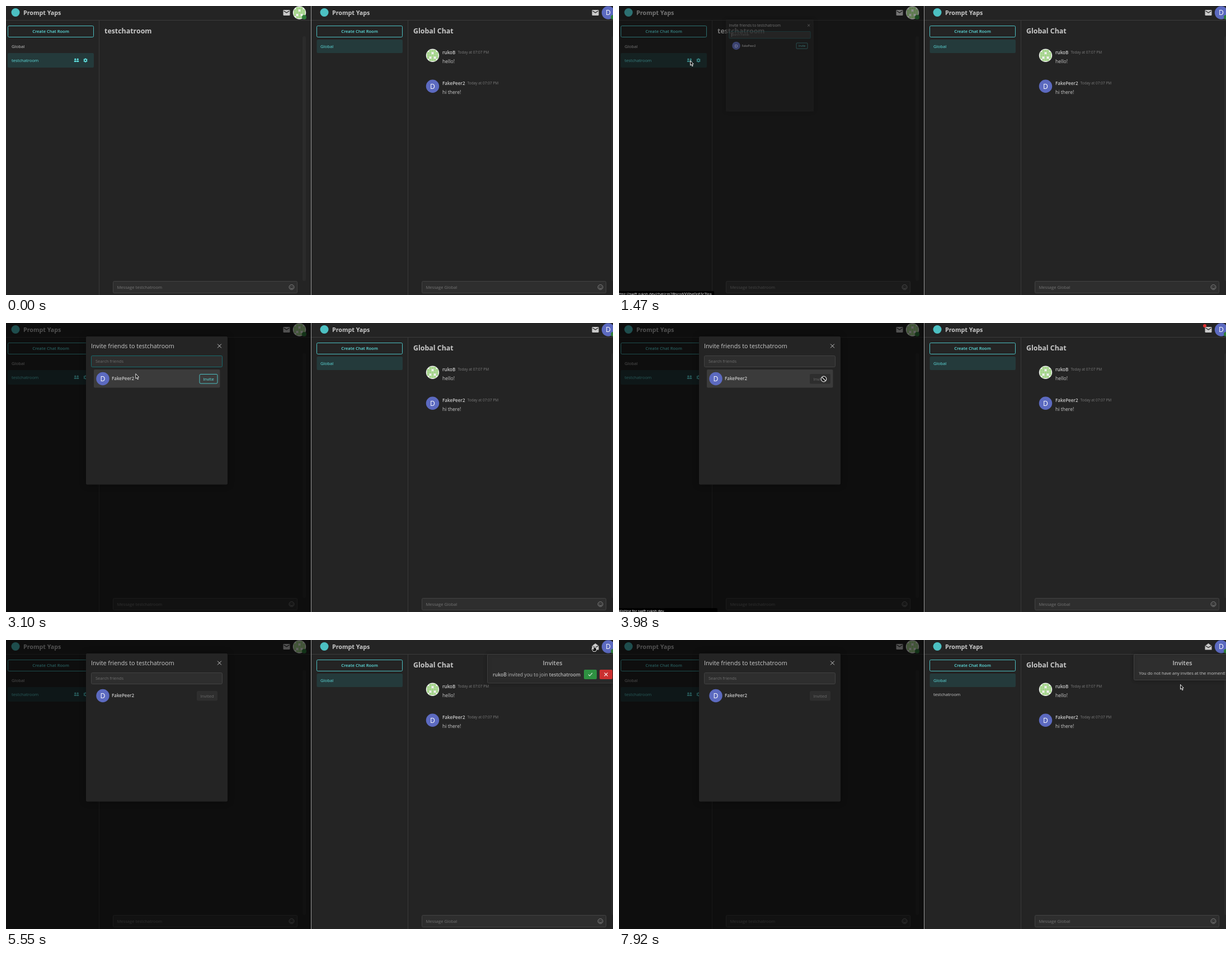
An HTML page with a canvas for the animation above (7990 ms loop, 1085 by 516 pixels).

```html
<!DOCTYPE html>
<html lang="en">
<head>
<meta charset="utf-8">
<title>Chat room invite</title>
<style>
html, body { margin: 0; width: 100%; height: 100%; overflow: hidden; background: #242424; }
canvas { display: block; }
</style>
</head>
<body>
<canvas id="stage" width="1085" height="516"></canvas>
<script>
const ctx = document.getElementById('stage').getContext('2d');
const LOOP = 7990;
const APP = 'Prompt Yaps', HOST = 'rukoB', GUEST = 'FakePeer2', ROOM = 'testchatroom';
const C = {
  bg: '#242424', panel: '#2e2e2e', line: '#424242', text: '#c9c9c9', dim: '#7a7a7a',
  cyan: '#5fe0e0', edge: '#4cc0c2', active: '#243a3b', indigo: '#5c6ac0', leaf: '#a4d48a',
  online: '#2f7d3b', green: '#2f9e44', red: '#e03131'
};

const clamp = v => Math.max(0, Math.min(1, v));
const ramp = (t, from, to) => clamp((t - from) / (to - from));
const easeOut = x => 1 - (1 - x) ** 2;
const between = (t, a, b) => t >= a && t < b;

function rect(x, y, w, h, fill, stroke, r = 2) {
  ctx.beginPath();
  ctx.roundRect(x, y, w, h, r);
  if (fill) { ctx.fillStyle = fill; ctx.fill(); }
  if (stroke) { ctx.strokeStyle = stroke; ctx.lineWidth = 1; ctx.stroke(); }
}

function disc(x, y, r, fill) {
  ctx.beginPath();
  ctx.arc(x, y, r, 0, Math.PI * 2);
  ctx.fillStyle = fill;
  ctx.fill();
}

function path(points, color, width = 1) {
  ctx.beginPath();
  points.forEach(([x, y]) => ctx.lineTo(x, y));
  ctx.strokeStyle = color;
  ctx.lineWidth = width;
  ctx.stroke();
}

// y is the middle of the capitals; returns the x after the text
function text(str, x, y, size, color = C.text, weight = 400, align = 'left') {
  ctx.font = `${weight} ${size}px "Open Sans", "Noto Sans", sans-serif`;
  ctx.textAlign = align;
  ctx.fillStyle = color;
  ctx.fillText(str, x, y + size * 0.36);
  return x + ctx.measureText(str).width;
}

function cross(x, y, r, color, width = 1) {
  path([[x - r, y - r], [x + r, y + r]], color, width);
  path([[x - r, y + r], [x + r, y - r]], color, width);
}

function letterAvatar(x, y) {
  disc(x, y, 11.7, C.indigo);
  text('D', x, y, 12.2, '#fff', 400, 'center');
}

function blockAvatar(x, y) {
  ctx.save();
  disc(x, y, 11.7, '#f0f0f0');
  ctx.clip();
  ctx.fillStyle = C.leaf;
  ['01110', '11011', '11111', '10101', '01110'].forEach((row, j) =>
    [...row].forEach((on, i) => {
      if (on === '1') ctx.fillRect(x - 10 + i * 4, y - 10 + j * 4, 4.05, 4.05);
    }));
  ctx.restore();
}

function mail(x, open) {
  if (open) {
    ctx.beginPath();
    [[x - 6, 10.5], [x, 6], [x + 6, 10.5], [x + 6, 17.5], [x - 6, 17.5]].forEach(p => ctx.lineTo(...p));
    ctx.fillStyle = C.text;
    ctx.fill();
    path([[x - 5, 10.5], [x, 13.5], [x + 5, 10.5]], C.bg, 1.2);
  } else {
    rect(x - 6, 7, 12, 10, C.text, null, 1.2);
    path([[x - 5, 8.8], [x, 12], [x + 5, 8.8]], C.bg, 1.2);
  }
}

function people(x, y) {
  for (const dx of [-2.2, 2.2]) {
    disc(x + dx, y - 1.8, 1.6, C.cyan);
    rect(x + dx - 2.1, y + 0.6, 4.2, 2.5, C.cyan, null, 1);
  }
}

function gear(x, y) {
  for (let i = 0; i < 6; i++) {
    const a = i * Math.PI / 3 + Math.PI / 6;
    disc(x + Math.cos(a) * 2.8, y + Math.sin(a) * 2.8, 1, C.cyan);
  }
  disc(x, y, 2.9, C.cyan);
  disc(x, y, 1.3, C.active);
}

function smiley(x, y) {
  ctx.strokeStyle = '#8c8c8c';
  ctx.lineWidth = 0.9;
  ctx.beginPath();
  ctx.arc(x, y, 4.4, 0, Math.PI * 2);
  ctx.stroke();
  ctx.beginPath();
  ctx.arc(x, y + 0.3, 2.3, 0.15, Math.PI - 0.15);
  ctx.stroke();
  disc(x - 1.5, y - 1.4, 0.6, '#8c8c8c');
  disc(x + 1.5, y - 1.4, 0.6, '#8c8c8c');
}

function message(y, name, body, avatar) {
  avatar(210.5, y + 5.2);
  const end = text(name, 228, y, 8.1, C.text, 600);
  text('Today at 07:07 PM', end + 4, y, 6.55, C.dim);
  text(body, 228, y + 16, 8.6);
}

function shell(title, placeholder, avatar, opened) {
  ctx.fillStyle = C.bg;
  ctx.fillRect(-6, 0, 552, 516);
  ctx.fillStyle = '#3b3b3b';
  ctx.fillRect(-6, 25, 551, 1);
  ctx.fillRect(166, 26, 1, 490);
  disc(17, 11.5, 7.5, C.edge);
  text(APP, 31, 12, 10.7, C.text, 700);
  mail(501.5, opened);
  avatar(524.5, 12);
  disc(533, 20, 4, C.online);
  rect(3.5, 35.5, 153, 20, null, C.edge);
  text('Create Chat Room', 80, 45.5, 7.5, C.cyan, 600, 'center');
  text(title, 176, 45, 12.4, C.text, 700);
  rect(530, 54, 6, 437, '#2b2b2b', null, 3);
  rect(191.5, 491.5, 329, 21, C.panel, C.line);
  text(placeholder, 198.5, 502, 7.6, '#747474');
  smiley(510.5, 502);
}

function hostSide() {
  shell(ROOM, 'Message ' + ROOM, blockAvatar, false);
  text('Global', 10, 72.5, 7.75);
  rect(3, 84, 154, 26, C.active);
  text(ROOM, 10, 97, 7.7, C.cyan);
  people(126, 97);
  gear(142, 97);
}

function guestSide(t) {
  const opened = t >= 5420, joined = t >= 7590;
  ctx.save();
  ctx.translate(552, 0);
  shell('Global Chat', 'Message Global', letterAvatar, opened);
  rect(3.5, 60, 153.5, 24, C.active);
  text('Global', 10, 72.5, 7.75, C.cyan);
  if (joined) text(ROOM, 10, 97, 7.7);
  message(83, HOST, 'hello!', blockAvatar);
  message(138, GUEST, 'hi there!', letterAvatar);
  ctx.restore();
  if (between(t, 3900, 5420)) disc(1047, 5, 3, C.red);
  if (opened) invites(t, joined);
}

function invites(t, joined) {
  ctx.save();
  ctx.globalAlpha = ramp(t, 5400, 5570);
  ctx.shadowColor = 'rgba(0,0,0,.3)';
  ctx.shadowBlur = 6;
  const x = joined ? 920.5 : 860.5;
  rect(x, 25.5, 240, joined ? 46 : 51.5, C.panel, C.line);
  ctx.shadowBlur = 0;
  text('Invites', joined ? 1007 : 977, 41, 10.9, C.text, 600, 'center');
  if (joined) {
    text('You do not have any invites at the moment!', 929.5, 59, 7.65);
  } else {
    let end = text(HOST, 870, 62, 8.6, C.text, 600);
    end = text(' invited you to join ', end, 62, 8.6);
    text(ROOM, end, 62, 8.6, C.text, 600);
    rect(1033, 53, 23, 17, t > 7180 ? '#2b8a3e' : C.green);
    path([[1041, 61.7], [1043.3, 64], [1048, 58.8]], '#fff', 1.1);
    rect(1061, 53, 23, 17, C.red);
    cross(1072.5, 61.5, 3, '#fff', 1.1);
  }
  ctx.restore();
}

function dialog(t) {
  const p = easeOut(ramp(t, 1394, 1594));
  if (!p) return;
  const sent = t >= 3840;
  const fade = p ** 1.4;
  ctx.fillStyle = `rgba(0,0,0,${0.6 * p ** 0.75})`;
  ctx.fillRect(0, 0, 545, 516);
  ctx.save();
  ctx.globalAlpha = fade;
  ctx.translate(269.5, 24);
  ctx.scale(p, p);
  ctx.translate(-269.5, -24);
  ctx.shadowColor = 'rgba(0,0,0,.35)';
  ctx.shadowBlur = 12 * p;
  rect(143, 24, 253, 264.5, C.bg);
  ctx.shadowBlur = 0;
  text('Invite friends to ' + ROOM, 152, 41, 10.75, C.text, 500);
  cross(381.5, 41, 3.4, C.text);
  rect(152.5, 58.5, 234, 20, C.panel, sent ? C.line : '#176a6d');
  text('Search friends', 160, 68.5, 7.5, '#6e6e6e');
  if (t < 1800) path([[160, 63], [160, 74]], C.text, 0.8);

  const hover = ramp(t, 1960, 2060) * (t < 4370 ? 1 : 0);
  if (hover) {
    ctx.globalAlpha = fade * hover;
    rect(157, 83, 225.5, 32.5, '#3b3b3b');
    ctx.globalAlpha = fade;
  }
  letterAvatar(173, 99.5);
  text(GUEST, 189, 99.5, 8, C.text, 600);
  if (sent) {
    rect(341, 91, 37, 17.5, C.panel);
    text('Invited', 359.5, 99.8, 7.7, '#696969', 400, 'center');
  } else {
    rect(346, 91.5, 32, 16.5, null, C.edge);
    text('Invite', 362, 99.8, 7.7, C.cyan, 500, 'center');
  }
  ctx.restore();
}

function status(t) {
  const late = t > 3000;
  const alpha = late
    ? ramp(t, 3840, 3940) * (1 - ramp(t, 4180, 4320))
    : ramp(t, 1250, 1330) * (1 - ramp(t, 2020, 2100));
  if (!alpha) return;
  const site = `swift.${HOST.toLowerCase()}.dev`;
  const link = t < 1700;
  ctx.save();
  ctx.globalAlpha = alpha;
  rect(-4, 509, link ? 174 : 180, 12, '#000');
  text(link ? `https://${site}/chat/cm28hico6000he0pfj3c7lira` : `Waiting for ${site}`,
    link ? -4 : -1, 515, 6.5, '#fff');
  ctx.restore();
}

function divider(t) {
  if (between(t, 4530, 4720)) {
    ctx.fillStyle = '#303030';
    ctx.fillRect(541, 0, 10, 516);
  } else {
    ctx.fillStyle = '#9a9a9a';
    ctx.fillRect(545, 0, 1, 516);
  }
}

// time, x, y of the pointer tip
const ROUTE = [
  [390, 340, 7], [620, 266, 46], [860, 168, 84], [1130, 127, 97], [1640, 127, 97],
  [2010, 159, 104], [2070, 159, 104], [2490, 166, 99], [2890, 166, 99],
  [3200, 262, 86], [3570, 363, 97], [3770, 366, 100], [4180, 366, 100],
  [4420, 448, 98], [4660, 659, 90], [4930, 989, 47], [5000, 989, 47],
  [5210, 1051, 9], [5420, 1051, 9], [6110, 1051, 14], [6180, 1051, 14],
  [6450, 1051, 22], [6640, 972, 58], [6850, 1043, 64], [7850, 1043, 66], [7920, 1003, 79]
];

function pointerAt(t) {
  const i = ROUTE.findIndex(k => k[0] > t);
  if (i < 0) return ROUTE[ROUTE.length - 1].slice(1);
  const [t0, x0, y0] = ROUTE[i - 1], [t1, x1, y1] = ROUTE[i];
  const k = (t - t0) / (t1 - t0);
  return [x0 + (x1 - x0) * k, y0 + (y1 - y0) * k];
}

function shape(points) {
  ctx.beginPath();
  points.forEach(p => ctx.lineTo(...p));
  ctx.closePath();
  ctx.fillStyle = '#161616';
  ctx.fill();
  ctx.strokeStyle = '#fff';
  ctx.lineWidth = 0.9;
  ctx.stroke();
}

function pointer(t) {
  if (t < 400) return;
  const [x, y] = pointerAt(t);
  ctx.save();
  ctx.translate(x, y);
  if (between(t, 3840, 4250)) {
    ctx.beginPath();
    ctx.arc(0, 0, 4.8, 0, Math.PI * 2);
    ctx.fillStyle = '#161616';
    ctx.fill();
    ctx.strokeStyle = '#ddd';
    ctx.lineWidth = 1.2;
    ctx.stroke();
    path([[-3.2, -3.2], [3.2, 3.2]], '#ddd', 1.4);
  } else if (between(t, 3500, 3840) || between(t, 5150, 6250) || between(t, 6830, 7590)) {
    shape([[-1, 0], [1, 0], [1, 3.5], [4.5, 4.5], [4.5, 8], [3, 10.5], [-1.5, 10.5], [-4, 6], [-3, 5.2], [-1, 7]]);
  } else {
    shape([[0.5, 0.5], [0.5, 9], [2.4, 7.4], [3.8, 10.6], [5.2, 10], [3.8, 6.8], [6.2, 6.6]]);
  }
  ctx.restore();
}

function draw() {
  const t = performance.now() % LOOP;
  guestSide(t);
  hostSide();
  dialog(t);
  divider(t);
  status(t);
  pointer(t);
  requestAnimationFrame(draw);
}
draw();
</script>
</body>
</html>
```
